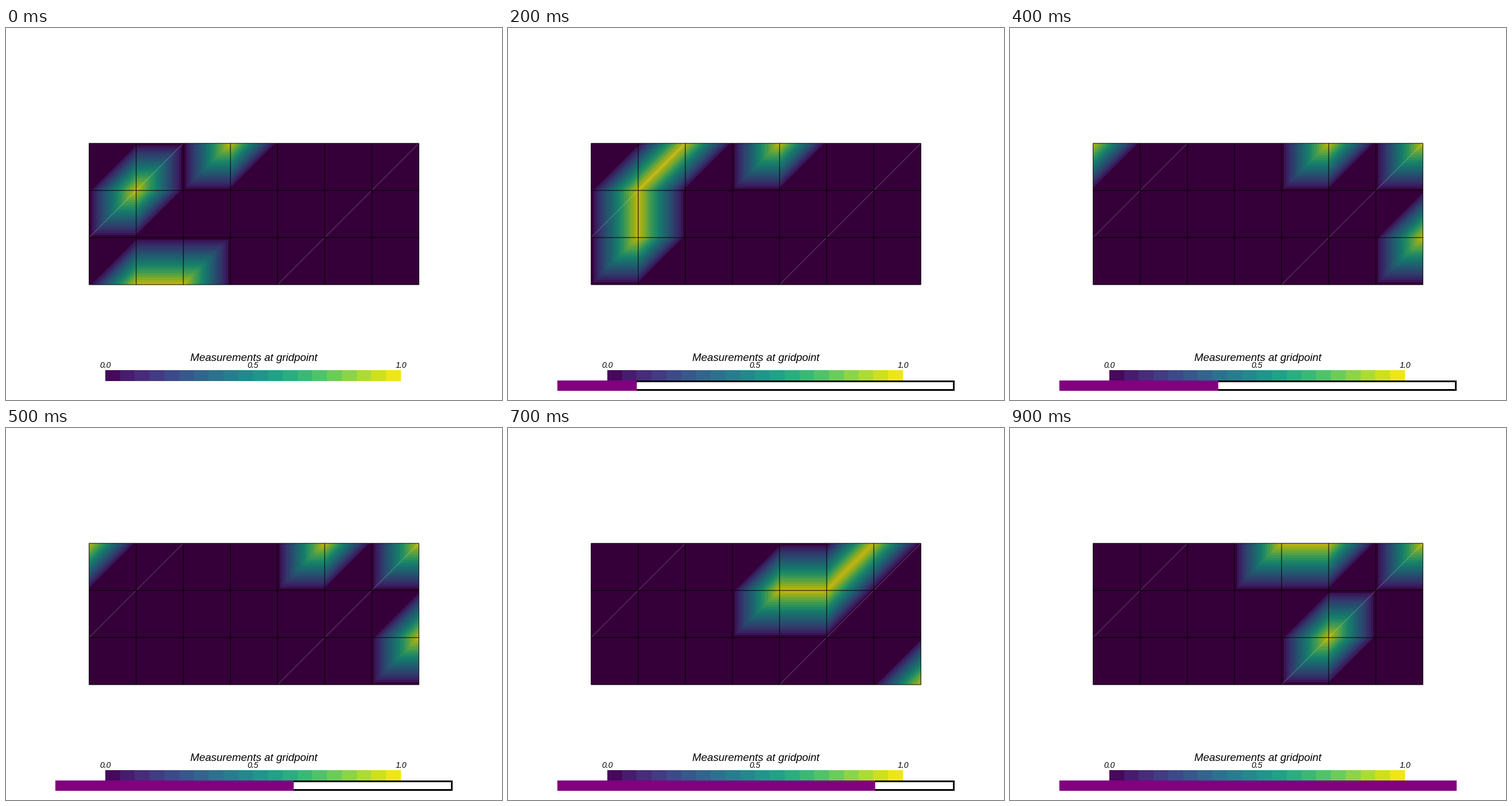
A matplotlib script for the animation above (1000 ms loop, 864x648 px).

```python
import numpy as np
import matplotlib.pyplot as plt
from matplotlib.animation import FuncAnimation
from matplotlib.patches import Rectangle

W, H, DPI = 864, 648, 72
COLS, ROWS, CELL = 7, 3, 82.08
X0, Y0 = (W - COLS * CELL) / 2, (H - ROWS * CELL) / 2
LEFT, TOP, RIGHT, BOTTOM = 145, 201, 719, 447
BAR_X, BAR_Y, BAR_W, BAR_H, BORDER = 86, 614, 692, 18, 3
BANDS, DIMMING = 20, 0.78

# Grid points (column, row from the top) that measure 1 at each time step.
STEPS = [
    [(1, 1), (3, 0), (1, 3), (2, 3)],
    [(1, 1), (2, 0), (1, 2), (4, 0)],
    [(0, 0), (5, 0), (7, 0), (7, 2)],
    [(4, 1), (5, 1), (6, 0), (7, 3)],
    [(4, 0), (5, 0), (7, 0), (5, 2)],
]

legend_colors = plt.get_cmap("viridis")((np.arange(BANDS) + 0.5) / BANDS)[:, :3]
surface_colors = legend_colors * DIMMING
surface_colors[0] = np.array([53, 0, 57]) / 255


def field_image(points):
    """Interpolate linearly over cells split along their rising diagonal."""
    node = np.zeros((ROWS + 1, COLS + 1))
    for col, row in points:
        node[row, col] = 1
    x = (np.arange(LEFT, RIGHT) + 0.5 - X0) / CELL
    y = (np.arange(TOP, BOTTOM) + 0.5 - Y0) / CELL
    gx, gy = np.meshgrid(x, y)
    i, j = gx.astype(int), gy.astype(int)
    u, v = gx - i, 1 - (gy - j)
    corner = np.where(u > v, node[j + 1, i + 1], node[j, i])
    low, high = np.minimum(u, v), np.maximum(u, v)
    value = (node[j + 1, i] * (1 - high) + corner * (high - low)
             + node[j, i + 1] * low)
    return surface_colors[np.clip((value * BANDS).astype(int), 0, BANDS - 1)]


def show(image, left, right, bottom, top):
    return ax.imshow(image, extent=(left, right, bottom, top),
                     interpolation="nearest", aspect="auto", zorder=1)


def grid_line(start, end, **style):
    """Draw a line between two grid points."""
    (c0, r0), (c1, r1) = start, end
    ax.plot([X0 + c0 * CELL, X0 + c1 * CELL], [Y0 + r0 * CELL, Y0 + r1 * CELL],
            solid_capstyle="butt", snap=False, **style)


def box(x, y, w, h, color, z):
    return ax.add_patch(Rectangle((x, y), w, h, facecolor=color, linewidth=0,
                                  snap=False, zorder=z))


def label(x, baseline, text, size):
    ax.text(x, baseline, text, fontsize=size, family="Liberation Sans",
            style="italic", color="black", ha="center", va="baseline", zorder=6)


fig = plt.figure(figsize=(W / DPI, H / DPI), dpi=DPI, facecolor="white")
ax = fig.add_axes([0, 0, 1, 1])
ax.axis("off")

fields = [field_image(points) for points in STEPS]
surface = show(fields[0], LEFT, RIGHT, BOTTOM, TOP)
show(legend_colors[None], 173, 688, 615, 596)
ax.set_xlim(0, W)
ax.set_ylim(H, 0)

for start, end in [((0, 2), (2, 0)), ((4, 3), (7, 0))]:
    grid_line(start, end, color="white", alpha=0.3, lw=0.8, zorder=2)
for col in range(COLS + 1):
    grid_line((col, 0), (col, ROWS), color="black", lw=1, zorder=3)
for row in range(ROWS + 1):
    grid_line((0, row), (COLS, row), color="black", lw=1, zorder=3)

label(432, 579.5, "Measurements at gridpoint", 18.7)
for x, text in [(173.5, "0.0"), (430, "0.5"), (688, "1.0")]:
    label(x, 591.5, text, 14)

outline = box(BAR_X, BAR_Y, BAR_W, BAR_H, "black", 4)
inside = box(BAR_X + BORDER, BAR_Y + BORDER,
             BAR_W - 2 * BORDER, BAR_H - 2 * BORDER, "white", 4)
progress = box(BAR_X, BAR_Y, 0, BAR_H, "purple", 5)


def update(frame):
    # Each step is shown twice; the bar advances on the second showing.
    surface.set_data(fields[frame // 2])
    for part in (outline, inside, progress):
        part.set_visible(frame > 0)
    progress.set_width(BAR_W * ((frame + 1) // 2) / len(STEPS))
    return surface, outline, inside, progress


animation = FuncAnimation(fig, update, frames=2 * len(STEPS), interval=100,
                          repeat=True, repeat_delay=0)
plt.show()
```
